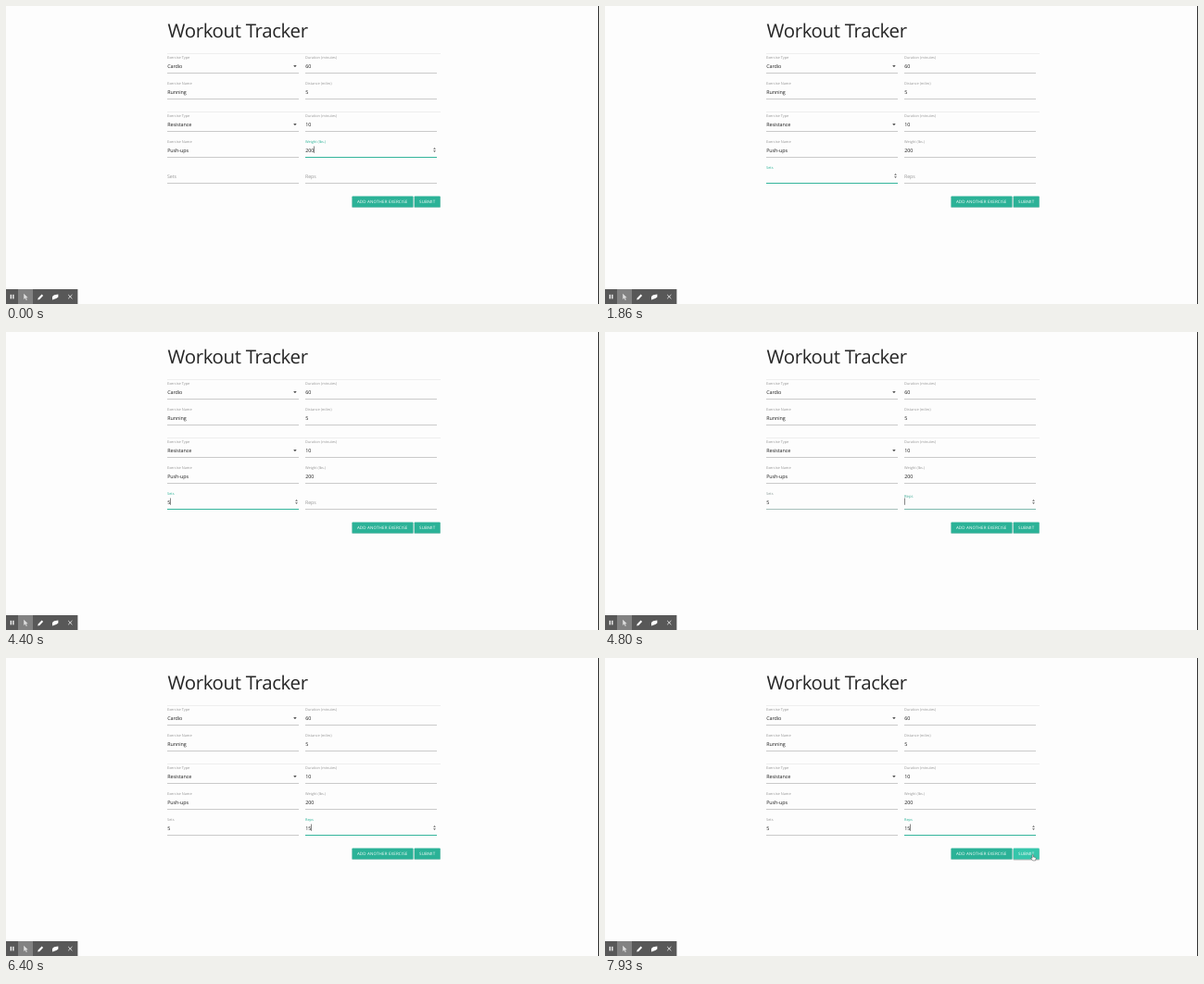
Recreate the animation shown at these times as an HTML page. Size 640x322 px, loop 8000 ms.

```html
<!DOCTYPE html>
<html lang="en">
<head>
<meta charset="utf-8">
<title>Workout Tracker</title>
<style>
  html, body { margin: 0; height: 100%; overflow: hidden; background: #fdfdfd; }
  svg { display: block; width: 100vw; height: 100vh; }
  text { font-family: "Open Sans", "Noto Sans", sans-serif; text-rendering: geometricPrecision; white-space: pre; }
  .title { font-size: 20.4px; letter-spacing: -.32px; fill: #262626; }
  .value { font-size: 5.4px; letter-spacing: -.07px; fill: #1c1c1c; }
  .button { font-size: 4.5px; font-weight: 500; letter-spacing: .13px; fill: #fff; }
</style>
</head>
<body>
<svg viewBox="0 0 640 322">
  <g id="still"></g>
  <g id="live"></g>
</svg>
<script>
const LOOP = 8000, LEFT = 174, RIGHT = 323, WIDTH = 142;
const GREY = [150, 150, 150], TEAL = [43, 178, 151], HOVER = [54, 198, 171];

const clamp = v => Math.max(0, Math.min(1, v));
const ease = v => 1 - (1 - clamp(v)) ** 3;
const lerp = (a, b, k) => a + (b - a) * k;
const mix = (a, b, k) => `rgb(${a.map((v, i) => Math.round(lerp(v, b[i], k)))})`;

const rect = (x, y, w, h, fill, more = '') =>
  `<rect x="${x}" y="${y}" width="${w}" height="${h}" fill="${fill}" ${more}/>`;
const path = (d, more) => `<path d="${d}" ${more}/>`;
const text = (x, y, cls, s, more = '') => `<text x="${x}" y="${y}" class="${cls}" ${more}>${s}</text>`;

// Every field is placed by the row of its underline.
const underline = (x, y, focus = 0) =>
  rect(x, y, WIDTH, lerp(.5, .95, focus), mix(GREY, TEAL, focus));
const label = (x, y, s, focus = 0, float = 1) =>
  text(x, y - lerp(5.2, 14.7, float), 'label', s,
    `style="font-size:${lerp(5.2, 3.9, float)}px;fill:${mix(GREY, TEAL, focus)}"`);
const value = (x, y, s) => text(x + .2, y - 5, 'value', s);
const field = (x, y, name, s) => label(x, y, name) + value(x, y, s) + underline(x, y);
const select = (y, s) => field(LEFT, y, 'Exercise Type', s) +
  path(`M310.2 ${y - 7.8}h3.5l-1.75 1.9z`, 'fill="#222"');

const caret = (x, y, s) => rect(x + .3 + 3 * s.length, y - 11.5, .5, 7.3, '#111');
const spinner = (x, y) => {
  const cx = x + 139.5, cy = y - 7.5;
  return path(`M${cx - 1.4} ${cy - .8}l1.4 -1.7l1.4 1.7zM${cx - 1.4} ${cy + .8}l1.4 1.7l1.4 -1.7z`, 'fill="#666"');
};

function button(x, w, s, hover = 0) {
  return rect(x - .2, 206.3 + hover * .4, w + .4, 11.8, '#000', `rx=".8" opacity="${.14 + .12 * hover}"`) +
    rect(x, 205.6, w, 11.9, mix(TEAL, HOVER, hover), 'rx=".6"') +
    text(x + 5.4, 213.1, 'button', s);
}

function toolbar() {
  const white = 'fill="#fff"';
  return rect(0, 306, 77.4, 16, '#585858') + rect(13, 306, 16, 16, '#828282') +
    rect(4.7, 311.8, 1.3, 4.6, '#fff') + rect(7.2, 311.8, 1.3, 4.6, '#fff') +
    path('M19.2 310.8v6.2l1.5 -1.4l1.1 2.4l1 -.5l-1.1 -2.3h2z', 'fill="#ddd"') +
    path('M34.2 317.4l.6 -2l3.8 -3.8l1.5 1.5l-3.8 3.8z', white) +
    path('M50 317.5v-3.6l2 -1.6l4.4 -.9v3l-2.2 1.7z', white) +
    path('M67.2 312l4.2 4.2m0 -4.2l-4.2 4.2', 'stroke="#fff" stroke-width=".8"');
}

function still() {
  return rect(639, 0, 1, 322, '#333') +
    text(174.5, 33.8, 'title', 'Workout Tracker') +
    rect(174, 51, 295, 1, '#eee') + rect(174, 114, 295, 1, '#eee') +
    select(72, 'Cardio') + field(RIGHT, 72, 'Duration (minutes)', '60') +
    field(LEFT, 100, 'Exercise Name', 'Running') + field(RIGHT, 100, 'Distance (miles)', '5') +
    select(135, 'Resistance') + field(RIGHT, 135, 'Duration (minutes)', '10') +
    field(LEFT, 163, 'Exercise Name', 'Push-ups') +
    button(373.5, 66, 'ADD ANOTHER EXERCISE') + toolbar();
}

const BLINK = 530;
const inputs = [
  { name: 'Weight (lbs.)', x: RIGHT, y: 163, from: -1000, to: 200, keys: [[-470, '200']] },
  { name: 'Sets', x: LEFT, y: 191, from: 200, to: 4700, keys: [[265, ''], [4330, '5']] },
  { name: 'Reps', x: RIGHT, y: 191, from: 4725, to: 1e5, keys: [[4725, ''], [6200, '1'], [6395, '15']] }
];

function input({ name, x, y, from, to, keys }, t) {
  const [since, s] = keys.filter(k => k[0] <= t).pop() || [t, ''];
  const active = t >= from && t < to;
  const fade = ms => ease((t - from) / ms) * (1 - ease((t - to) / ms));
  let out = label(x, y, name, fade(200), ease((t - from) / 200)) +
    value(x, y, s) + underline(x, y, fade(300));
  if (active) {
    out += spinner(x, y);
    if (Math.floor((t - since) / BLINK) % 2 === 0) out += caret(x, y, s);
  }
  return out;
}

// time, x, y of the pointer tip
const track = [[7200, 469, 134], [7330, 464.6, 169.3], [7460, 462.5, 190], [7600, 461.3, 205], [7930, 461.7, 212.3]];

function pointer(t) {
  if (t < track[0][0]) return '';
  const i = track.findIndex(p => p[0] > t);
  let [, x, y] = track[track.length - 1];
  if (i > 0) {
    const [a, b] = [track[i - 1], track[i]], k = (t - a[0]) / (b[0] - a[0]);
    x = lerp(a[1], b[1], k);
    y = lerp(a[2], b[2], k);
  }
  const hand = t >= 7600;
  const d = hand
    ? 'm-.6 .4q.6 -.7 1.2 0v2.3l2.3 .5q.6 .3 .5 1l-.5 2.4h-3l-2 -2.6q.3 -.8 1.5 0z'
    : 'v5.6l1.3 -1.2l1 2.2l.9 -.4l-1 -2.1h1.8z';
  return path(`M${x} ${y}${d}`, 'fill="#fff" stroke="#444" stroke-width=".5" stroke-linejoin="round"');
}

const live = document.getElementById('live');
document.getElementById('still').innerHTML = still();

function draw(now) {
  const t = now % LOOP;
  live.innerHTML = inputs.map(f => input(f, t)).join('') +
    button(440.7, 28, 'SUBMIT', ease((t - 7600) / 200)) + pointer(t);
  requestAnimationFrame(draw);
}
draw(performance.now());
</script>
</body>
</html>
```
